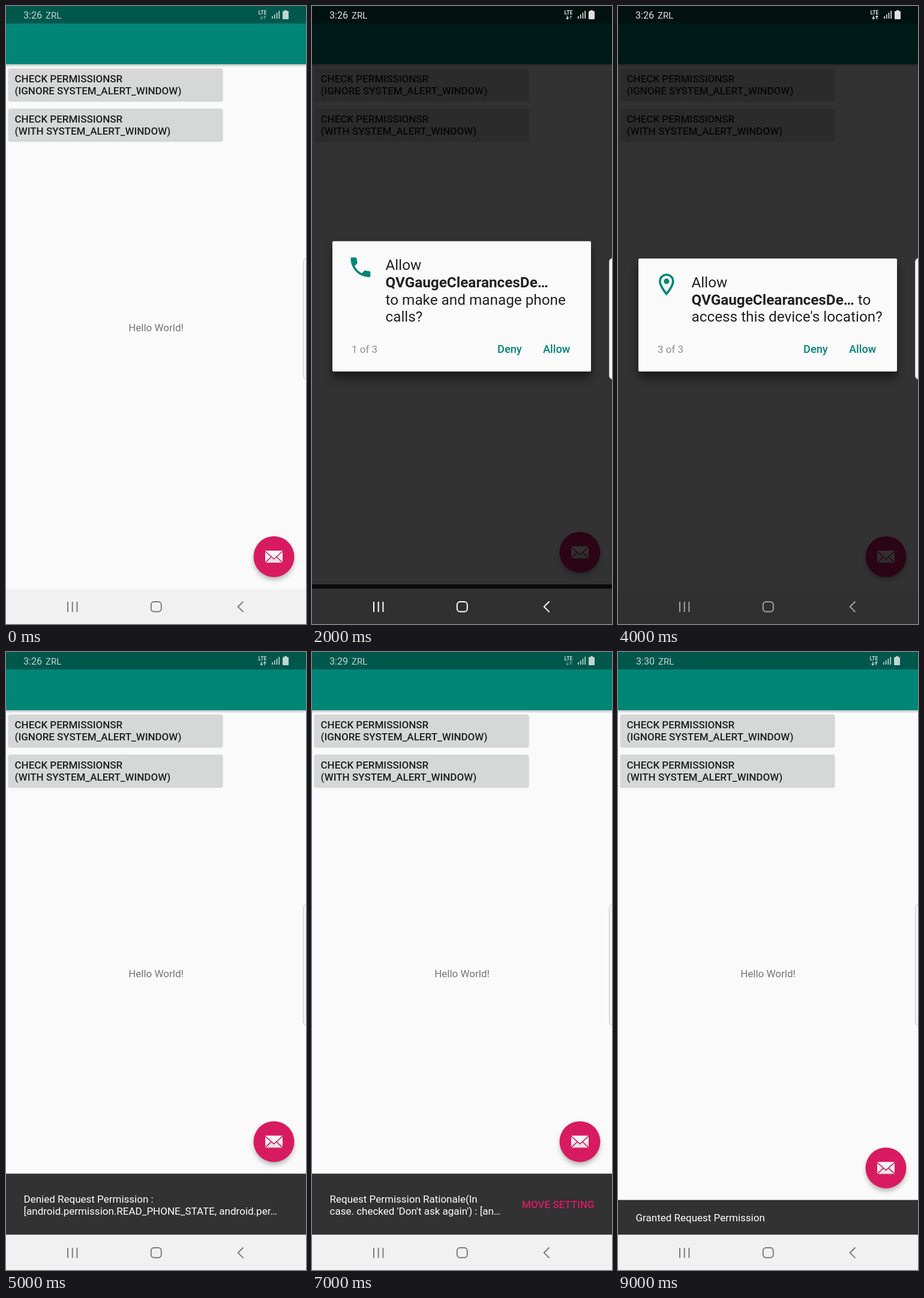
Write an HTML page that moves like this. It is 500 px wide and 1028 px high and loops after 10000 ms.

```html
<!DOCTYPE html>
<html lang="en">
<head>
<meta charset="utf-8">
<title>Permission check demo</title>
<style>
  html, body { margin: 0; width: 100%; height: 100%; overflow: hidden; background: #fafafa; }
  svg { display: block; width: 100%; height: 100%; }
  text { font-family: Roboto, sans-serif; font-size: 17px; white-space: pre; }
  .medium { font-weight: 500; }
  .title { font-size: 24.3px; fill: #212121; }
  .bold { font-weight: 700; }
  .action { font-size: 18.2px; font-weight: 500; fill: #008577; }
</style>
</head>
<body>
<svg id="stage" viewBox="0 0 500 1028" preserveAspectRatio="none">
  <defs>
    <filter id="soft" x="-30%" y="-30%" width="160%" height="160%"><feGaussianBlur stdDeviation="4"/></filter>
    <filter id="faint" x="-5%" y="-20%" width="110%" height="140%"><feGaussianBlur stdDeviation="1"/></filter>
    <filter id="deep" x="-20%" y="-20%" width="140%" height="150%"><feGaussianBlur stdDeviation="7"/></filter>
    <linearGradient id="paper" x1="0" y1="0" x2="0" y2="1">
      <stop offset="0" stop-color="#fff"/><stop offset="1" stop-color="#dedede"/>
    </linearGradient>
  </defs>
  <g id="scene"></g>
</svg>
<script>
const APP = 'QVGaugeClearancesDe…';
const CARRIER = 'ZRL';
const STEP = 1000;
const TEAL = '#008577', PINK = '#d81b60';

const ICONS = {
  phone: 'M6.62 10.79c1.44 2.83 3.76 5.14 6.59 6.59l2.2-2.2c.27-.27.67-.36 1.02-.24 1.12.37 2.33.57 3.57.57.55 0 1 .45 1 1V20c0 .55-.45 1-1 1-9.39 0-17-7.61-17-17 0-.55.45-1 1-1h3.5c.55 0 1 .45 1 1 0 1.25.2 2.45.57 3.57.11.35.03.74-.25 1.02z',
  pin: 'M12 2C8.13 2 5 5.13 5 9c0 5.25 7 13 7 13s7-7.75 7-13c0-3.87-3.13-7-7-7zM7 9c0-2.76 2.24-5 5-5s5 2.24 5 5c0 2.88-2.88 7.19-5 9.88C9.92 16.21 7 11.85 7 9zM12 6.5a2.5 2.5 0 0 1 0 5a2.5 2.5 0 0 1 0-5z',
  sms: 'M20 2H4c-1.1 0-2 .9-2 2v18l4-4h14c1.1 0 2-.9 2-2V4c0-1.1-.9-2-2-2zM9 11H7V9h2zM13 11h-2V9h2zM17 11h-2V9h2z'
};

const rect = (x, y, w, h, fill, extra = '') =>
  `<rect x="${x}" y="${y}" width="${w}" height="${h}" fill="${fill}" ${extra}/>`;
const text = (x, y, str, attrs = '') => `<text x="${x}" y="${y}" ${attrs}>${str}</text>`;
const icon = (name, x, y, size = 43.75, fill = TEAL) =>
  `<path transform="translate(${x} ${y}) scale(${size / 24})" d="${ICONS[name]}" fill="${fill}" fill-rule="evenodd"/>`;

function button(y, second) {
  return rect(4, y + 1, 357, 53.5, '#000', 'opacity=".22" rx="2" filter="url(#faint)"')
    + rect(4.5, y, 355.5, 53, '#d6d7d7', 'rx="1.5"')
    + text(14.5, y + 23.4, 'CHECK PERMISSIONSR', 'class="medium" fill="#1f1f1f"')
    + text(14.5, y + 43.3, second, 'class="medium" fill="#1f1f1f"');
}

function fab(y) {
  return `<g transform="translate(446.5 ${y})">
    <circle cy="5" r="33" opacity=".3" filter="url(#soft)"/>
    <circle r="34" fill="${PINK}"/>
    <rect x="-14.5" y="-10" width="29" height="20" rx="1" fill="url(#paper)"/>
    <path d="M-14.5-9L0 4L14.5-9M-14 9.5L-4.5 .5M14 9.5L4.5 .5" fill="none" stroke="${PINK}" stroke-width="1.6"/>
  </g>`;
}

function snackbar({ top, lines = [], action }) {
  const first = lines.length > 1 ? 915.6 : 947.2;
  return rect(0, top, 500, 969.5 - top, '#323232')
    + lines.map((line, i) => text(29.5, first + i * 19.9, line, 'fill="#fff"')).join('')
    + (action ? text(350, 925.3, action, `class="medium" fill="${PINK}"`) : '');
}

function home({ snack }) {
  return rect(0, 97, 500, 3, '#000', 'opacity=".18" filter="url(#faint)"')
    + rect(0, 0, 500, 97, TEAL)
    + rect(0, 0, 500, 29, '#00574b')
    + button(104, '(IGNORE SYSTEM_ALERT_WINDOW)')
    + button(170.7, '(WITH SYSTEM_ALERT_WINDOW)')
    + text(250, 540.5, 'Hello World!', 'text-anchor="middle" fill="#757575"')
    + fab(snack ? snack.top - 53.3 : 916)
    + (snack ? snackbar(snack) : '');
}

const toggle = (y, on) => rect(434, y - 10, 38, 20, on ? '#3e91ff' : '#bdbdbd', 'rx="10"')
  + `<circle cx="${on ? 462 : 444}" cy="${y}" r="8" fill="#fff"/>`;

function settings({ title, rows, note = [] }) {
  return `<path d="M33 55l-8 8l8 8" fill="none" stroke="#333" stroke-width="2"/>`
    + text(50, 71, title, 'class="title bold"')
    + rect(29, 112, 44, 44, TEAL, 'rx="10"')
    + text(90, 140, APP, 'font-size="20" fill="#212121"')
    + rect(0, 176, 500, 1, '#dedede')
    + rows.map(([label, glyph, on], i) => {
        const y = 212 + i * 68;
        return (glyph ? icon(glyph, 32, y - 15, 30, '#666') : '')
          + text(glyph ? 90 : 29, y + 7, label, 'fill="#212121" style="font-size:20.6px"')
          + toggle(y, on) + rect(glyph ? 90 : 0, y + 34, 500, 1, '#dedede');
      }).join('')
    + note.map((line, i) => text(29, 275 + i * 20, line, 'fill="#757575"')).join('');
}

function dialog({ top, bottom = 608, glyph, lines, count, checked }) {
  const foot = bottom - 31.3;
  return rect(34, top + 10, 431, bottom - top, '#000', 'opacity=".5" filter="url(#deep)"')
    + rect(34, top, 431, bottom - top, '#fafafa', 'rx="2"')
    + icon(glyph, 59, top + 21.5)
    + text(122.5, top + 48, 'Allow', 'class="title"')
    + lines.map((line, i) => text(122.5, top + 76.7 + i * 28.7, line, 'class="title"')).join('')
    + (checked
      ? `<circle cx="78" cy="${bottom - 90.5}" r="12.7" fill="#4294f7"/>
         <path d="M72 ${bottom - 90.5}l4.3 4.5l8-8.7" fill="none" stroke="#fff" stroke-width="2"/>`
        + text(97.5, bottom - 84.3, "Don't ask again", 'fill="#212121"')
      : '')
    + text(66, foot, `${count} of 3`, 'fill="#8f8f8f"')
    + text(309, foot, 'Deny', 'class="action"')
    + text(385, foot, 'Allow', `class="action"${checked ? ' style="fill:#d0d0d0"' : ''}`);
}

function statusBar({ clock = '3:26', arrows, ink, level, shift = 0 }) {
  const arrow = (x, flip, lit) =>
    `<path transform="translate(${x} 19) scale(1 ${flip})" d="M0-3V2.5M-2 .5L0 2.8L2 .5" fill="none" stroke="${ink}" stroke-width="1.3" opacity="${lit ? 1 : .5}"/>`;
  const bars = [4, 7, 10, 13].map((h, i) => rect(443 + i * 3.8, 21 - h, 1.7, h, ink)).join('');
  return `<g opacity="${level}" fill="${ink}">
    <g transform="translate(${shift})">
      ${text(29, 21, clock, 'style="font-size:16.2px"')}
      ${text(66, 20.5, CARRIER, 'style="font-size:15px"')}
    </g>
    <g transform="translate(${-shift})">
      ${text(420.5, 13.7, 'LTE', 'class="bold" style="font-size:8.6px"')}
      ${arrow(425.8, 1, arrows > 0)}${arrow(431.3, -1, arrows > 1)}${bars}
      <path d="M464 7h4v1.5h2q1 0 1 1V21q0 1-1 1h-8q-1 0-1-1V9.500q0-1 1-1h2z"/>
    </g>
  </g>`;
}

const navIcons = color => `<g fill="none" stroke="${color}" stroke-width="2">
  <path d="M103 991v17M110.700 991v17M118.400 991v17"/>
  <rect x="241.800" y="991" width="17" height="16.500" rx="5"/>
  <path d="M395.500 990.500l-8.800 8.800l8.800 8.800"/></g>`;

const edgeHandle = `<rect x="495.5" y="419.500" width="14" height="201.500" rx="6" fill="#f4f4f4" stroke="#c4c4c4"/>`;

function draw(s) {
  return rect(0, 0, 500, 1028, '#fafafa')
    + (s.page ? settings(s.page) : home(s))
    + rect(0, 969.5, 500, 58.5, '#f1f1f1')
    + (s.dialog ? rect(0, 0, 500, 1028, '#000', 'opacity=".8"') + dialog(s.dialog) : '')
    + edgeHandle
    + statusBar({ ...s, ink: s.page ? '#555' : '#fff', level: s.dialog ? .87 : .75 })
    + navIcons(s.nav || (s.dialog ? '#a3a3a3' : '#7c7c7c'));
}

const name = `<tspan class="bold">${APP}</tspan>`;
const callLines = [name, 'to make and manage phone', 'calls?'];

const scenes = [
  { arrows: 0 },
  { arrows: 0, page: {
      title: 'Appear on top',
      rows: [['Allow permission', null, true]],
      note: ['This permission allows an app to show things on top', "of other apps you're using. This may interfere with", 'your use of other apps.'] } },
  { arrows: 1, nav: '#fff', snack: { top: 962 }, dialog: { top: 391.3, glyph: 'phone', lines: callLines, count: 1 } },
  { arrows: 2, dialog: { top: 420, glyph: 'sms', lines: [name + ' to', 'send and view SMS messages?'], count: 2 } },
  { arrows: 2, dialog: { top: 420, glyph: 'pin', lines: [name + ' to', "access this device's location?"], count: 3 } },
  { arrows: 2, snack: { top: 867.7, lines: ['Denied Request Permission :', '[android.permission.READ_PHONE_STATE, android.per…'] } },
  { arrows: 0, dialog: { top: 365, bottom: 634.7, glyph: 'phone', lines: callLines, count: 1, checked: true } },
  { arrows: 0, clock: '3:29', snack: { top: 867.7, action: 'MOVE SETTING',
      lines: ['Request Permission Rationale(In', "case. checked 'Don't ask again') : [an…"] } },
  { arrows: 0, clock: '3:30', page: {
      title: 'App permissions',
      rows: [['Location', 'pin', true], ['Phone', 'phone', true], ['SMS', 'sms', true]] } },
  { arrows: 2, clock: '3:30', shift: 1, snack: { top: 911.5, lines: ['Granted Request Permission'] } }
];

const scene = document.getElementById('scene');
const start = performance.now();
let shown = -1;

function tick() {
  const index = Math.floor((performance.now() - start) / STEP) % scenes.length;
  if (index !== shown) {
    scene.innerHTML = draw(scenes[index]);
    shown = index;
  }
  requestAnimationFrame(tick);
}
tick();
</script>
</body>
</html>
```
